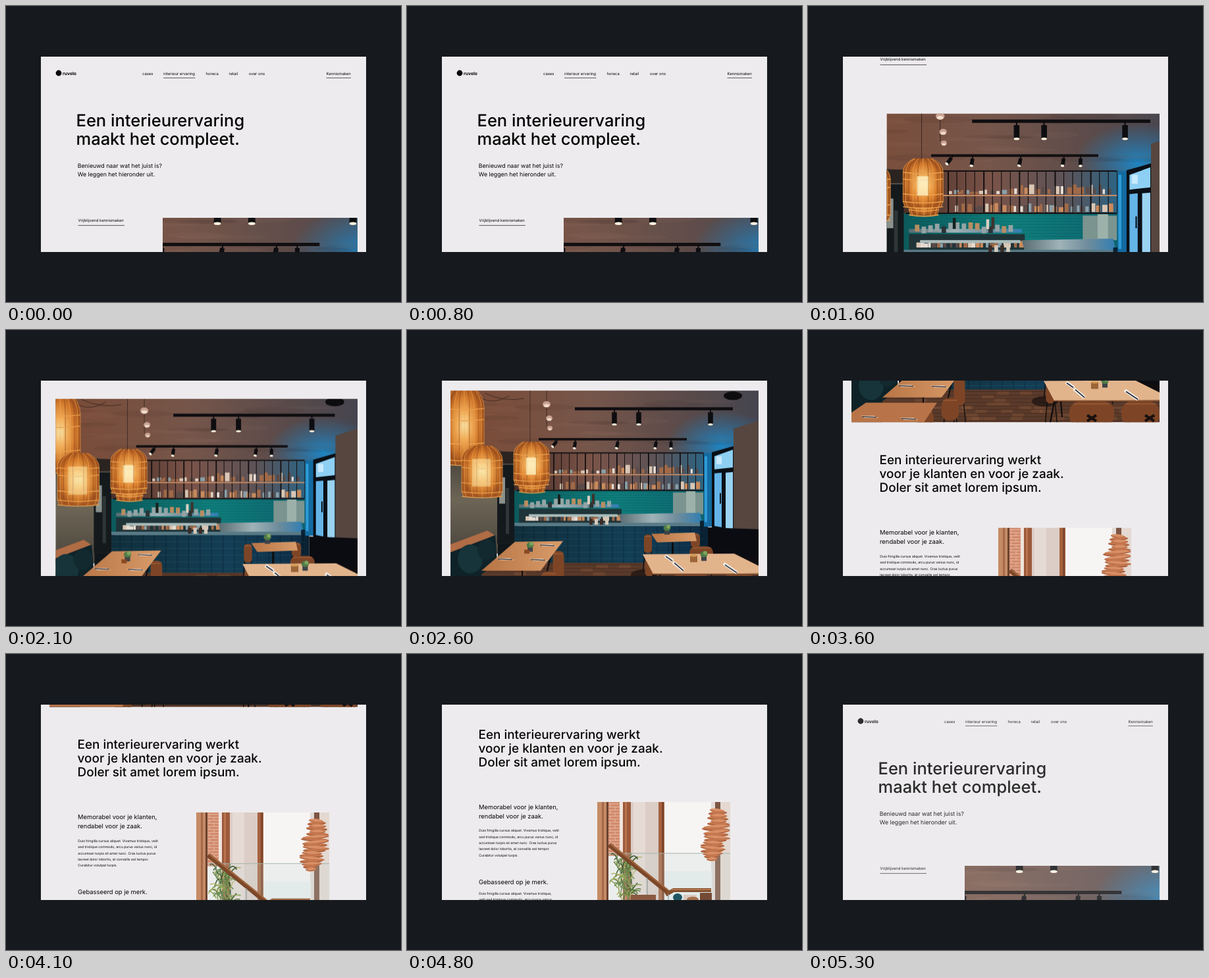
These frames come from a looping animation (600x450 px, 5400 ms). An HTML page:

```html
<!DOCTYPE html>
<html lang="nl">
<head>
<meta charset="utf-8">
<title>Interieurervaring</title>
<style>
  @property --y { syntax: '<number>'; inherits: true; initial-value: 0; }

  html, body { margin: 0; width: 100%; height: 100%; overflow: hidden; background: #16191d; }
  svg { display: block; overflow: visible; }

  .screen { position: absolute; left: 53px; top: 77px; width: 494px; height: 297px; overflow: hidden; background: #edebed; }
  .page {
    --p: min(1, var(--y) / 355);
    position: absolute; left: -53px; top: -77px; width: 600px; height: 1200px;
    transform: translateY(calc(var(--y) * -1px));
    animation: scroll 5400ms infinite, fade 5400ms linear infinite;
  }
  .copy { position: absolute; left: 0; top: 0; font-family: Inter, 'Open Sans', sans-serif; fill: #050505; text-rendering: geometricPrecision; }
  .h1 { font-size: 25.5px; font-weight: 500; }
  .h2 { font-size: 18.9px; font-weight: 500; }
  .h3 { font-size: 9.4px; }
  .lead { font-size: 8.8px; }
  .nav { font-size: 5.92px; }
  .body { font-size: 5.07px; }
  .logo { font-size: 6.8px; font-weight: 700; }

  .hero {
    position: absolute; left: 66px; top: 322px; width: 468px; height: 312px;
    transform: translateY(calc(var(--p) * 125px));
    clip-path: inset(0 0 0 calc((1 - var(--p)) * 172px));
  }
  .hero svg { overflow: hidden; transform: scale(calc(1.41 - var(--p) * .41)); }
  .side { position: absolute; left: 289px; top: 919px; width: 202px; height: 200px; }
  .side svg { overflow: hidden; }

  @keyframes scroll {
    0%, 16.11% { --y: 0; animation-timing-function: cubic-bezier(.333, 0, .2, 1); }
    48.15% { --y: 355; animation-timing-function: cubic-bezier(.333, 0, .2, 1); }
    86.11%, 93.7% { --y: 694; animation-timing-function: step-end; }
    93.71%, 100% { --y: 0; }
  }
  @keyframes fade {
    0%, 88.9% { opacity: 1; }
    93.7% { opacity: 0; }
    99.07%, 100% { opacity: 1; }
  }
</style>
</head>
<body>
<div class="screen">
  <div class="page">
    <svg class="copy" width="600" height="1200">
      <circle cx="80" cy="102" r="4.4"/>
      <text class="logo" x="86" y="104.6">ruvelo</text>
      <g class="nav">
        <text x="207" y="105">cases</text>
        <text x="239" y="105">interieur ervaring</text>
        <text x="303.5" y="105">horeca</text>
        <text x="338.5" y="105">retail</text>
        <text x="369" y="105">over ons</text>
        <text x="486.5" y="105">Kennismaken</text>
        <text x="109.5" y="327.5">Vrijblijvend kennismaken</text>
      </g>
      <path d="M239 109.3h48.5M486.5 109.3h37.5M109.5 333.6H180" stroke="#333" stroke-width=".8"/>
      <g class="h1">
        <text x="106.5" y="183">Een interieurervaring</text>
        <text x="106.5" y="211">maakt het compleet.</text>
      </g>
      <g class="lead">
        <text x="108.7" y="246">Benieuwd naar wat het juist is?</text>
        <text x="108.7" y="258.5">We leggen het hieronder uit.</text>
      </g>
      <g class="h2">
        <text x="108.6" y="822.5">Een interieurervaring werkt</text>
        <text x="108.6" y="843.6">voor je klanten en voor je zaak.</text>
        <text x="108.6" y="864.7">Doler sit amet lorem ipsum.</text>
      </g>
      <g class="h3">
        <text x="109" y="929.6">Memorabel voor je klanten,</text>
        <text x="109" y="943.6">rendabel voor je zaak.</text>
        <text x="109" y="1043.6">Gebasseerd op je merk.</text>
      </g>
      <g class="body">
        <text x="109.3" y="964.4">Duis fringilla cursus aliquet. Vivamus tristique, velit</text>
        <text x="109.3" y="973.7">sed tristique commodo, arcu purus varius nunc, id</text>
        <text x="109.3" y="983">accumsan turpis sit amet nunc. Cras luctus purus</text>
        <text x="109.3" y="992.3">laoreet dolor lobortis, at convallis est tempor.</text>
        <text x="109.3" y="1001.6">Curabitur volutpat turpis.</text>
        <text x="109.3" y="1060">Duis fringilla cursus aliquet. Vivamus tristique,</text>
        <text x="109.3" y="1069.3">velit sed tristique commodo, arcu purus varius</text>
      </g>
    </svg>

    <div class="hero">
      <svg width="468" height="312" viewBox="66 92 468 312">
        <defs>
          <linearGradient id="ceil"><stop stop-color="#7b4a35"/><stop offset=".45" stop-color="#76564a"/><stop offset=".75" stop-color="#5b4b4a"/><stop offset="1" stop-color="#45454f"/></linearGradient>
          <radialGradient id="blue"><stop stop-color="#1f86c4"/><stop offset=".45" stop-color="#2d74a4" stop-opacity=".7"/><stop offset="1" stop-color="#2d6f9c" stop-opacity="0"/></radialGradient>
          <radialGradient id="lamp"><stop stop-color="#fff0b4"/><stop offset=".35" stop-color="#fbb65c"/><stop offset=".75" stop-color="#d97d2b"/><stop offset="1" stop-color="#a9551d"/></radialGradient>
          <linearGradient id="back"><stop stop-color="#4a3028"/><stop offset=".4" stop-color="#7a5348"/><stop offset=".75" stop-color="#5c5358"/><stop offset="1" stop-color="#2c6484"/></linearGradient>
          <linearGradient id="tile"><stop stop-color="#0c5a5c"/><stop offset=".5" stop-color="#0f7f7c"/><stop offset="1" stop-color="#0d6470"/></linearGradient>
          <linearGradient id="steel"><stop stop-color="#586c72"/><stop offset=".4" stop-color="#9fb3b8"/><stop offset=".7" stop-color="#6f8c9c"/><stop offset="1" stop-color="#2f7fb4"/></linearGradient>
          <linearGradient id="bar"><stop stop-color="#102f3c"/><stop offset=".6" stop-color="#133e55"/><stop offset="1" stop-color="#0d2c46"/></linearGradient>
          <linearGradient id="wood"><stop stop-color="#b87545"/><stop offset="1" stop-color="#d99c6a"/></linearGradient>
          <linearGradient id="wall" x2="0" y2="1"><stop stop-color="#3f3b36"/><stop offset=".5" stop-color="#6d6556"/><stop offset="1" stop-color="#4b453c"/></linearGradient>
        </defs>
        <g id="room"></g>
      </svg>
    </div>

    <div class="side">
      <svg width="202" height="200" viewBox="289 225 202 200">
        <g id="loft"></g>
      </svg>
    </div>
  </div>
</div>

<script>
  const seeded = s => () => (s = s * 16807 % 2147483647) / 2147483647;
  const rect = (x, y, w, h, fill) => `<rect x="${x}" y="${y}" width="${w}" height="${h}" fill="${fill}"/>`;
  const poly = (points, fill) => `<polygon points="${points}" fill="${fill}"/>`;
  const oval = (x, y, rx, ry, fill) => `<ellipse cx="${x}" cy="${y}" rx="${rx}" ry="${ry}" fill="${fill}"/>`;
  const line = (d, stroke, w = 1) => `<path d="${d}" fill="none" stroke="${stroke}" stroke-width="${w}"/>`;
  const times = (n, fn) => Array.from({ length: n }, (_, i) => fn(i)).join('');
  const pick = (list, r) => list[Math.floor(r() * list.length)];

  // Woven lantern: domed body with ribs and hoops
  function lantern(cx, top, w, h) {
    const r = w / 2, dome = h * .28, low = top + h;
    const rib = k => `M${cx + k * r * .45} ${top}Q${cx + k * r} ${top + dome * .4} ${cx + k * r} ${top + dome}V${low - 8}L${cx + k * r * .88} ${low}`;
    const body = `M${cx - r * .45} ${top}Q${cx - r} ${top + dome * .4} ${cx - r} ${top + dome}V${low - 8}L${cx - r * .88} ${low}H${cx + r * .88}L${cx + r} ${low - 8}V${top + dome}Q${cx + r} ${top + dome * .4} ${cx + r * .45} ${top}Z`;
    return `<path d="${body}" fill="url(#lamp)" opacity=".93"/>` +
      times(13, i => line(rib(Math.cos(i * Math.PI / 12)), i % 2 ? '#8f4a1a' : '#f0a652', .7)) +
      [dome, dome * 1.5, h * .72, h - 8, h - 1].map(y => line(`M${cx - r} ${top + y}Q${cx} ${top + y + 4} ${cx + r} ${top + y}`, '#e9a04c', 1.3)).join('');
  }

  const chair = (x, y, w, h) =>
    line(`M${x - w * .3} ${y}l-4 ${h + 14}M${x + w * .3} ${y}l5 ${h + 14}`, '#120e0d', 1.4) +
    `<rect x="${x - w / 2}" y="${y - h / 2}" width="${w}" height="${h}" rx="${Math.min(w, h) * .42}" fill="#7d4526"/>` +
    line(`M${x - w * .4} ${y - h * .4}h${w * .8}`, '#a9663c', 1);

  const setting = (x, y) =>
    poly(`${x},${y} ${x + 20},${y} ${x + 27},${y + 3} ${x + 6},${y + 3}`, '#e8ddd2') +
    line(`M${x + 2} ${y + 1}l22 1`, '#2a2326', 1.2);

  const plant = (x, y) =>
    rect(x - 4, y - 2, 8, 8, '#3d4348') + oval(x, y - 4, 5.5, 4.5, '#4f7b45') + oval(x + 2, y - 6, 3, 3, '#7ea45f');

  function room() {
    const r = seeded(41);
    const jars = (x0, x1, base, tall) => {
      let s = '';
      for (let x = x0; x < x1; x += 4 + r() * 5) {
        const h = tall * (.5 + r() * .5);
        s += rect(x, base - h, 3 + r() * 4, h, pick(['#d9c6b4', '#a06a48', '#8aa0a8', '#c98a5c', '#e6dcd2', '#5a4a48'], r));
      }
      return s;
    };
    const spot = (x, y, w, h) => rect(x - w / 2, y, w, h, '#0d0d10') + oval(x, y + h, w / 2, 1.6, '#fff3df');

    let s = rect(66, 92, 468, 115, 'url(#ceil)') + oval(478, 176, 85, 54, 'url(#blue)');
    s += times(26, () => {
      const x = 80 + r() * 400, y = 98 + r() * 78;
      return oval(x, y, 20 + r() * 35, 2 + r() * 3, r() > .5 ? 'rgba(190,140,115,.06)' : 'rgba(30,20,20,.07)');
    });
    s += line('M105 96q18 22 50 4M118 96q30 14 60 8M187 92v80M212 92v55', '#33241e', .8);

    // Walls, door and shelving
    s += poly('66,176 163,186 163,340 66,340', 'url(#wall)') + rect(66, 185, 97, 18, '#2b231f');
    s += rect(137, 205, 30, 120, '#14191c') + rect(140, 224, 9, 40, '#8a918c') + rect(150, 240, 5, 70, '#2e3638');
    s += rect(163, 186, 290, 60, 'url(#back)') + rect(163, 244, 290, 50, 'url(#tile)');
    s += times(8, i => line(`M183 ${247 + i * 4}H405`, 'rgba(3,50,55,.35)', .5));
    s += rect(404, 247, 46, 33, '#7b948f') + rect(424, 245, 14, 33, '#9db1ab');
    s += jars(222, 300, 218, 6) + jars(305, 446, 218, 13) + jars(232, 445, 242, 12);
    s += times(20, i => rect(222 + i * 12, 187, i % 4 ? 1 : 1.8, 57, '#130f10'));
    s += [186, 219, 243].map((y, i) => rect(i ? 166 : 212, y, i ? 284 : 238, 1.8, i == 1 ? '#c98d65' : '#141112')).join('');

    // Kitchen line and bar
    s += rect(170, 265, 152, 5, 'url(#steel)') + times(15, i => rect(178 + i * 9, 265 - 3 - r() * 6, 6, 9, pick(['#94a3a4', '#2b3436', '#b88d62'], r)));
    s += rect(229, 250, 4, 15, '#17211f') + rect(274, 252, 4, 13, '#d8d0c0') + rect(281, 249, 4, 16, '#40322c');
    s += rect(170, 272, 156, 22, '#1f3438') + jars(180, 320, 290, 10) + rect(185, 280, 135, 4, '#a9bbba');
    s += poly('322,280 445,278 449,296 326,296', 'url(#steel)') + rect(163, 293, 292, 5, '#577a86');
    s += rect(163, 298, 292, 57, 'url(#bar)') + rect(445, 290, 12, 60, '#0a2234');
    s += times(5, i => line(`M163 ${308 + i * 10}H450`, 'rgba(90,150,170,.25)', .6)) +
      times(17, i => line(`M${176 + i * 17} 298v57`, 'rgba(3,14,24,.45)', .8));
    s += times(4, i => rect(277 + i * 8, 287, 5, 9, i % 2 ? '#d5c9ba' : '#3c2c26'));

    // Window side
    s += rect(451, 187, 14, 112, '#146ba0') + rect(452, 192, 4, 100, '#2e9bd6');
    s += poly('463,186 498,176 498,310 463,302', '#0a0f16') + poly('467,192 495,182 495,209 467,212', '#8ed0f4');
    s += poly('467,218 478,217 478,300 467,298', '#64b4e8') + poly('484,217 495,216 495,304 484,301', '#9ad2f2');
    s += rect(470, 192, 8, 12, '#c9eafc') + rect(475, 248, 2, 16, '#0b1118');
    s += poly('496,150 534,138 534,310 496,308', '#56463f') + poly('457,300 534,303 534,352 457,345', '#0b0c11');
    s += oval(495, 100, 14, 6.5, '#0d0c0f');

    // Floor and seats
    s += rect(66, 354, 468, 50, '#5a3a2a');
    s += times(9, i => line(`M66 ${357 + i * 5.5}H534`, 'rgba(30,16,12,.4)', .7)) +
      times(40, () => rect(120 + r() * 400, 357 + Math.floor(r() * 9) * 5.5, 18, 5, 'rgba(190,125,85,.16)'));
    s += rect(457, 345, 77, 14, '#0f0d10') + oval(360, 372, 20, 8, 'rgba(15,10,10,.6)');
    s += poly('66,326 122,305 133,312 66,342', '#b06c45') + poly('66,338 134,312 137,352 113,372 113,404 66,404', '#0e2228');
    s += oval(96, 348, 19, 22, '#16343a') + oval(121, 334, 14, 16, '#12292f') + rect(138, 325, 28, 30, '#10161a');
    s += chair(230, 357, 17, 42) + chair(366, 325, 12, 28) + chair(438, 320, 14, 22) + chair(447, 340, 36, 22) + chair(369, 358, 15, 34);
    s += poly('371,310 437,308 440,321 380,323', 'url(#wood)') + rect(402, 323, 3, 18, '#0f0c0d') + plant(395, 305);
    s += line('M175 364v30M218 345l-12 50', '#0f0c0d', 2);
    s += poly('113,366 164,322 237,321 203,366', 'url(#wood)') + setting(136, 347) + setting(186, 348) + setting(200, 326) + plant(187, 331) + rect(178, 334, 8, 6, '#8a4a22');
    s += chair(216, 384, 26, 34) + chair(178, 400, 26, 30);
    s += poly('66,389 88,374 196,374 176,404 66,404', '#b87448') + setting(80, 394) + setting(140, 397);
    s += line('M374 372l-6 32M384 372l2 24', '#0f0c0d', 2.2);
    s += poly('358,341 497,340 535,359 535,370 374,371', '#e2b48c') + line('M374 371H535', '#8e5a38', 1.5);
    s += line('M392 343l12 8M404 353l16 13M481 355l20 14', '#f3efe9', 5) + line('M393 344l10 7M406 354l14 12M483 357l18 12', '#202a38', 1.6);
    s += rect(430, 343, 11, 10, '#9b6538') + oval(435.5, 343, 5.5, 1.8, '#d49a55') + plant(451, 345);
    s += chair(431, 391, 68, 38) + chair(505, 391, 58, 38);
    s += line('M424 393l14 9M438 393l-14 9M512 393l14 9M526 393l-14 9', '#18110f', 4);

    // Lighting
    s += rect(255, 117.5, 240, 4.5, '#0e0d10') + [315, 352, 461].map(x => rect(x - 1, 121, 2, 4, '#0e0d10') + spot(x, 125, 7.6, 18.5)).join('');
    s += rect(200, 164.3, 225, 3.6, '#120f11');
    s += [229, 256, 321, 379, 401].map((x, i) => `<g transform="rotate(${[38, 8, 12, 10, 0][i]} ${x} 167)">${rect(x - .8, 167, 1.6, 4, '#0e0d10')}${spot(x, 170, 5, 10)}</g>`).join('');
    s += [[212, 113, 6], [216, 134, 5], [217, 149, 4]].map(([x, y, d]) => oval(x, y, d, d * .8, '#c8a391') + oval(x, y + 2, d * .7, d * .4, '#f3dccb')).join('');
    s += lantern(190, 205, 40, 42) + lantern(189, 170, 54, 66) + rect(181, 194, 15, 26, 'rgba(255,246,200,.75)');
    s += lantern(87, 86, 60, 119) + lantern(114, 176, 62, 78) + rect(99, 196, 28, 42, 'rgba(255,240,180,.45)');
    return s;
  }

  function loft() {
    const r = seeded(7);
    let s = rect(289, 225, 202, 200, '#f7f5f4');
    s += rect(289, 225, 15, 200, '#c58b66') + rect(296, 225, 3, 200, '#a76a48') + rect(303, 225, 3, 200, '#6d4330');
    s += rect(306, 225, 17, 82, '#d18a6c') + times(17, i => line(`M306 ${228 + i * 4.6}h17M${309 + i % 2 * 7} ${228 + i * 4.6}v4.6`, '#edc4b0', .8));
    s += rect(323, 225, 6, 200, '#f0e3dc') + rect(328, 225, 12, 200, '#9c5a3b') + rect(331, 225, 3, 200, '#b9744f');
    s += rect(340, 225, 43, 200, '#dccdc6') + rect(344, 225, 18, 200, '#e6dad4');
    s += rect(382, 225, 9, 200, '#a6623f') + rect(387, 225, 3, 200, '#7e472d');
    s += rect(462, 225, 7, 200, '#e3dad6') + rect(468, 225, 8, 200, '#7d5543') + rect(476, 225, 15, 200, '#e4d8d1');
    s += rect(391, 330, 72, 95, '#eceff0') + rect(306, 303, 185, 122, 'rgba(195,215,210,.22)') + line('M306 303H491', '#a3b5ad', 1);

    // Wicker lamp
    s += times(19, i => {
      const y = 238 + i * 4.1, w = [11, 14, 13, 16, 12, 17, 20, 21, 20, 18, 20, 17, 15, 18, 19, 17, 15, 11, 8][i];
      const x = 467 + (i < 6 ? 4 : i > 11 ? -5 : 1) + r() * 3;
      return `<g transform="rotate(${r() * 14 - 7} ${x} ${y})">${oval(x, y, w, 3.1, i % 2 ? '#c4764d' : '#d98f66')}${line(`M${x - w} ${y}q${w} 4 ${w * 2} 0`, '#8f4e30', .8)}</g>`;
    });

    // Palm leaves
    s += times(75, () => {
      const x = 318 + r() * 24, y = 312 + r() * 60, a = r() * 6.28, d = 10 + r() * 16;
      return line(`M${x} ${y}q${d * Math.cos(a) * .6} ${-6 - r() * 8} ${d * Math.cos(a)} ${d * Math.sin(a) * .8}`, pick(['#5d7b3f', '#87a052', '#3d5a34', '#b3b56a', '#6f8f58'], r), 1.5);
    });

    s += line('M307 290L397 363', '#7c4729', 7) + line('M309 289L398 360', '#a5683f', 2);
    s += line('M393 366l12-7H462', '#84502f', 6) + line('M401 358H462', '#b0754c', 1.8);
    s += line('M365 340v60M397 365v40', '#8c9a9a', 1.2);
    s += oval(411, 370, 7, 6, '#1f5562') + rect(420, 366, 20, 30, '#d9c9be') + rect(445, 363, 18, 40, '#754a35') + oval(434, 373, 9, 4, '#a66f4b');
    s += rect(340, 366, 38, 40, '#8a5a40');
    return s;
  }

  document.getElementById('room').innerHTML = room();
  document.getElementById('loft').innerHTML = loft();
</script>
</body>
</html>
```
